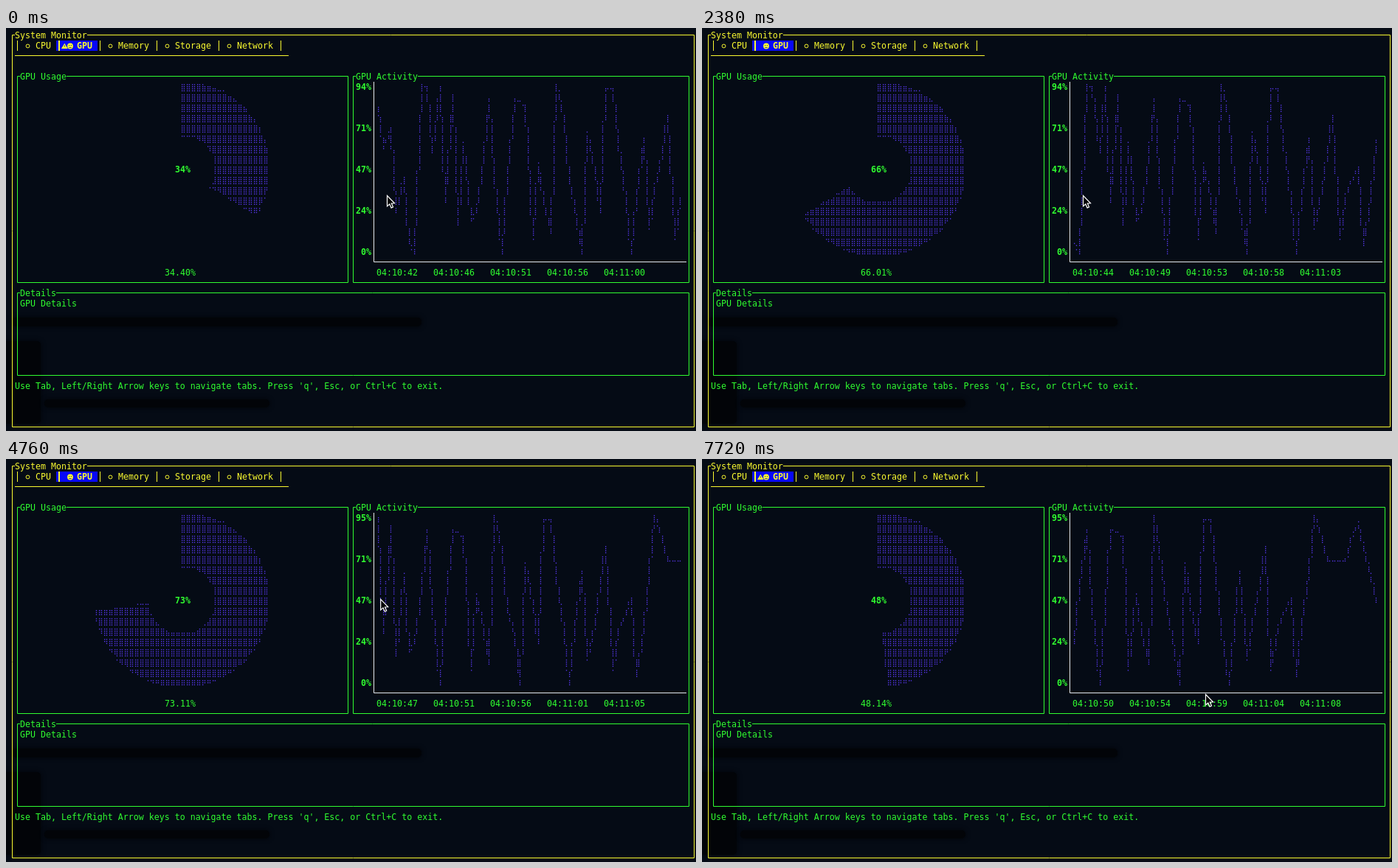
Animation, 935 px wide and 547 px high, one loop 8000 ms. Source, as an HTML page with a canvas:

```html
<!DOCTYPE html>
<html lang="en">
<head>
<meta charset="utf-8">
<title>System Monitor</title>
<style>
  html, body { margin: 0; width: 100%; height: 100%; overflow: hidden; background: #050b15; }
  canvas { display: block; }
</style>
</head>
<body>
<canvas id="stage" width="935" height="547"></canvas>
<script>
const ctx = document.getElementById('stage').getContext('2d');
const LOOP = 8000, STEP = 148.4, WINDOW = 50;
const YELLOW = '#fbfb30', GREEN = '#30fd30', DOTS = '#5838f0', WHITE = '#e8eaec';
const FONT = '11.627px "DejaVu Sans Mono", monospace';

// Turning points of the GPU load in percent, by sample number.
const turns = Object.entries({
  0: 85, 6: 2, 7: 98.6, 16: 25, 18: 90, 20: 1, 22: 90, 24: 87, 25: 11, 26: 53, 28: 13,
  29: 98.6, 33: 1, 34: 71, 36: 25, 37: 96, 38: 96, 41: 1, 43: 67, 44: 16, 47: 81, 48: 11,
  49: 34.4, 51: 51.9, 52: 5.53, 54: 66.01, 55: 99.2, 57: 73.05, 60: 73.14, 62: 95.46, 65: 48.14
}).map(([i, load]) => [+i, load]);
// Pointer stops: step, x, y.
const pointerStops = [
  [30, 516, 227], [36, 482, 84], [38, 482, 84], [40, 506, 43], [45, 608, 191],
  [48, 608, 191], [52, 682, 319]
];

const lerp = (a, b, t) => a + (b - a) * t;

// The neighbouring keys of a position and how far it lies between them.
function between(keys, at) {
  const n = Math.max(1, keys.findIndex(key => key[0] >= at));
  const [a, b] = at >= keys.at(-1)[0] ? keys.slice(-2) : [keys[n - 1], keys[n]];
  return [a, b, Math.min(1, Math.max(0, (at - a[0]) / (b[0] - a[0])))];
}

// Straight runs between turns; long runs carry a saw-tooth ripple.
function load(i) {
  const [a, b, t] = between(turns, i);
  const ripple = 6 * Math.max(0, b[0] - a[0] - 3) * Math.sin(Math.PI * t);
  if (t === 0 || t === 1) return lerp(a[1], b[1], t);
  return Math.min(97, Math.max(1, lerp(a[1], b[1], t) + (i % 2 ? -ripple : ripple)));
}

// Terminal cells are 7 by 14 pixels.
const cellX = col => 5 + 7 * col;
const cellY = row => 3 + 14 * row;
const midX = col => cellX(col) + 3.5;
const midY = row => cellY(row) + 6.5;

function text(string, col, row, color, bold = false) {
  ctx.font = (bold ? 'bold ' : '') + FONT;
  ctx.fillStyle = color;
  ctx.fillText(string, cellX(col), cellY(row) + 11);
}

function line(color, ...points) {
  ctx.strokeStyle = color;
  ctx.lineWidth = 1;
  ctx.beginPath();
  points.forEach(([x, y]) => ctx.lineTo(x, y));
  ctx.stroke();
}

function box(title, left, top, right, bottom, color) {
  const x1 = midX(left), x2 = midX(right), y1 = midY(top), y2 = midY(bottom);
  line(color, [cellX(left + 1), y1], [x1, y1], [x1, y2], [x2, y2], [x2, y1],
    [cellX(left + 1 + title.length), y1]);
  text(title, left + 1, top, color);
}

// Braille dot: two across and four down in each cell.
function dot(col, row, x, y) {
  const dx = Math.abs(x % 2), dy = y % 4;
  ctx.fillRect(cellX(col + (x - dx) / 2) + 2 + dx * 2.8,
    cellY(row + (y - dy) / 4) + 3.2 + dy * 2.8, 1.35, 1.35);
}

// Bresenham line of dots.
function dotLine(x, y, x2, y2, plot) {
  const dx = Math.abs(x2 - x), dy = -Math.abs(y2 - y);
  const sx = Math.sign(x2 - x), sy = Math.sign(y2 - y);
  for (let err = dx + dy; ;) {
    plot(x, y);
    if (x === x2 && y === y2) return;
    const e2 = 2 * err;
    if (e2 >= dy) { err += dy; x += sx; }
    if (e2 <= dx) { err += dx; y += sy; }
  }
}

function backdrop() {
  ctx.fillStyle = '#050b15';
  ctx.fillRect(0, 0, 935, 547);
  ctx.fillStyle = ctx.shadowColor = '#020408';
  ctx.shadowBlur = 6;
  for (const [x, y, w, h] of [[8, 393, 555, 12], [-10, 425, 57, 112], [52, 504, 305, 11]]) {
    ctx.beginPath();
    ctx.roundRect(x, y, w, h, 5);
    ctx.fill();
  }
  ctx.shadowBlur = 0;
}

function circle(x, y, r) {
  ctx.beginPath();
  ctx.arc(x, y, r, 0, 7);
}

function tabs(warning) {
  ctx.fillStyle = '#0808f8';
  ctx.fillRect(cellX(9), cellY(1), 56, 14);
  let col = 1;
  for (const name of ['CPU', 'GPU', 'Memory', 'Storage', 'Network', '']) {
    const active = name === 'GPU';
    ctx.fillStyle = ctx.strokeStyle = YELLOW;
    ctx.lineWidth = 1;
    ctx.fillRect(midX(col) - 0.5, cellY(1), active ? 2 : 1, 14);
    if (!name) break;
    text(name, col + 4, 1, YELLOW, active);
    circle(active ? 87 : midX(col + 2), 24.5, active ? 3.9 : 2.4);
    active ? ctx.fill() : ctx.stroke();
    col += name.length + 5;
  }
  if (warning) {
    ctx.beginPath();
    ctx.moveTo(79.3, 20.8);
    ctx.lineTo(83.6, 28);
    ctx.lineTo(75, 28);
    ctx.fill();
  }
  ctx.fillStyle = '#3030a0';
  ctx.fillRect(85, 23, 1.2, 1.2);
  ctx.fillRect(87.8, 23, 1.2, 1.2);
  ctx.fillRect(85.3, 26, 3.4, 1);
  if (warning) ctx.fillRect(78.8, 23.2, 1, 2.4);
  line(YELLOW, [cellX(1), midY(2)], [cellX(54), midY(2)]);
}

// Half the width of each row of a midpoint disc, from its centre outwards.
function discRows(radius) {
  const rows = [];
  let x = radius - 1, y = 0, dx = 1, dy = 1, err = 1 - 2 * radius;
  while (x >= y) {
    rows[y] = x;
    rows[x] = Math.max(rows[x] ?? 0, y);
    if (err <= 0) { y++; err += dy; dy += 2; }
    if (err > 0) { x--; dx += 2; err += dx - 2 * radius; }
  }
  return rows;
}
const rim = discRows(34), hole = discRows(13);

function donut(value) {
  const percent = Math.floor(value), end = Math.round(percent * 3.6);
  ctx.fillStyle = DOTS;
  for (let y = -33; y <= 33; y++) {
    const outer = rim[Math.abs(y)], inner = hole[Math.abs(y)] ?? -1;
    for (let x = -outer; x <= outer; x++) {
      const angle = (Math.round(Math.atan2(x, -y) * 180 / Math.PI) + 360) % 360;
      if (Math.abs(x) > inner && angle <= end) dot(33, 5, x, y + 33);
    }
  }
  const label = percent + '%';
  text(label, 33 - Math.floor(label.length / 2), 13, GREEN, true);
  text(value.toFixed(2) + '%', 30, 23, GREEN);
}

function clock(seconds) {
  const pad = n => String(Math.floor(n)).padStart(2, '0');
  return `04:${pad(10 + seconds / 60)}:${pad(seconds % 60)}`;
}

function chart(shift) {
  const shown = Array.from({ length: WINDOW }, (_, i) => load(shift + i));
  const max = Math.max(...shown), xStep = 117 / (WINDOW - 1);
  line(WHITE, [midX(70), cellY(5)], [midX(70), midY(22)], [cellX(131), midY(22)]);
  for (let k = 0; k <= 4; k++) {
    const label = Math.round(max * 64 / 67 * k / 4) + '%';
    text(label, 70 - label.length, 21 - 4 * k, GREEN, true);
    const index = Math.round(22 * k / xStep);
    text(clock(42.2 + (shift + index) / 2), 71 + 11 * k, 23, GREEN);
  }
  const points = shown.map((v, i) => [Math.round(i * xStep), Math.round((1 - v / max) * 67)]);
  const lit = new Set();
  for (let i = 1; i < points.length; i++) {
    dotLine(...points[i - 1], ...points[i], (x, y) => lit.add(x * 68 + y));
  }
  ctx.fillStyle = DOTS;
  lit.forEach(n => dot(71, 5, Math.floor(n / 68), n % 68));
}

function pointer(step) {
  const [a, b, t] = between(pointerStops, step);
  const ease = t * t * (3 - 2 * t);
  ctx.save();
  ctx.translate(lerp(a[1], b[1], ease) + 0.5, lerp(a[2], b[2], ease) + 0.5);
  ctx.beginPath();
  [[0, 0], [0, 14.5], [3.3, 11.5], [5.6, 16.6], [8, 15.5], [5.8, 10.6], [10, 10.3]]
    .forEach(([x, y]) => ctx.lineTo(x, y));
  ctx.closePath();
  ctx.fillStyle = '#000';
  ctx.fill();
  ctx.strokeStyle = '#fff';
  ctx.lineWidth = 1.2;
  ctx.stroke();
  ctx.restore();
}

function draw(time) {
  // The screen refreshes in even steps; a new sample comes every third or fourth.
  const step = Math.floor((time + 3) / STEP);
  const shift = Math.floor(0.3 * step + 0.45);
  backdrop();
  box('System Monitor', 0, 0, 132, 38, YELLOW);
  tabs(step < 14 || step >= 46);
  box('GPU Usage', 1, 4, 65, 24, GREEN);
  box('GPU Activity', 66, 4, 131, 24, GREEN);
  box('Details', 1, 25, 131, 33, GREEN);
  text('GPU Details', 2, 26, GREEN);
  text("Use Tab, Left/Right Arrow keys to navigate tabs. Press 'q', Esc, or Ctrl+C to exit.",
    1, 34, GREEN);
  donut(load(shift + WINDOW - 1));
  chart(Math.min(shift, 16));
  pointer(step);
}

const startTime = performance.now();
function tick() {
  draw((performance.now() - startTime) % LOOP);
  requestAnimationFrame(tick);
}
tick();
</script>
</body>
</html>
```
